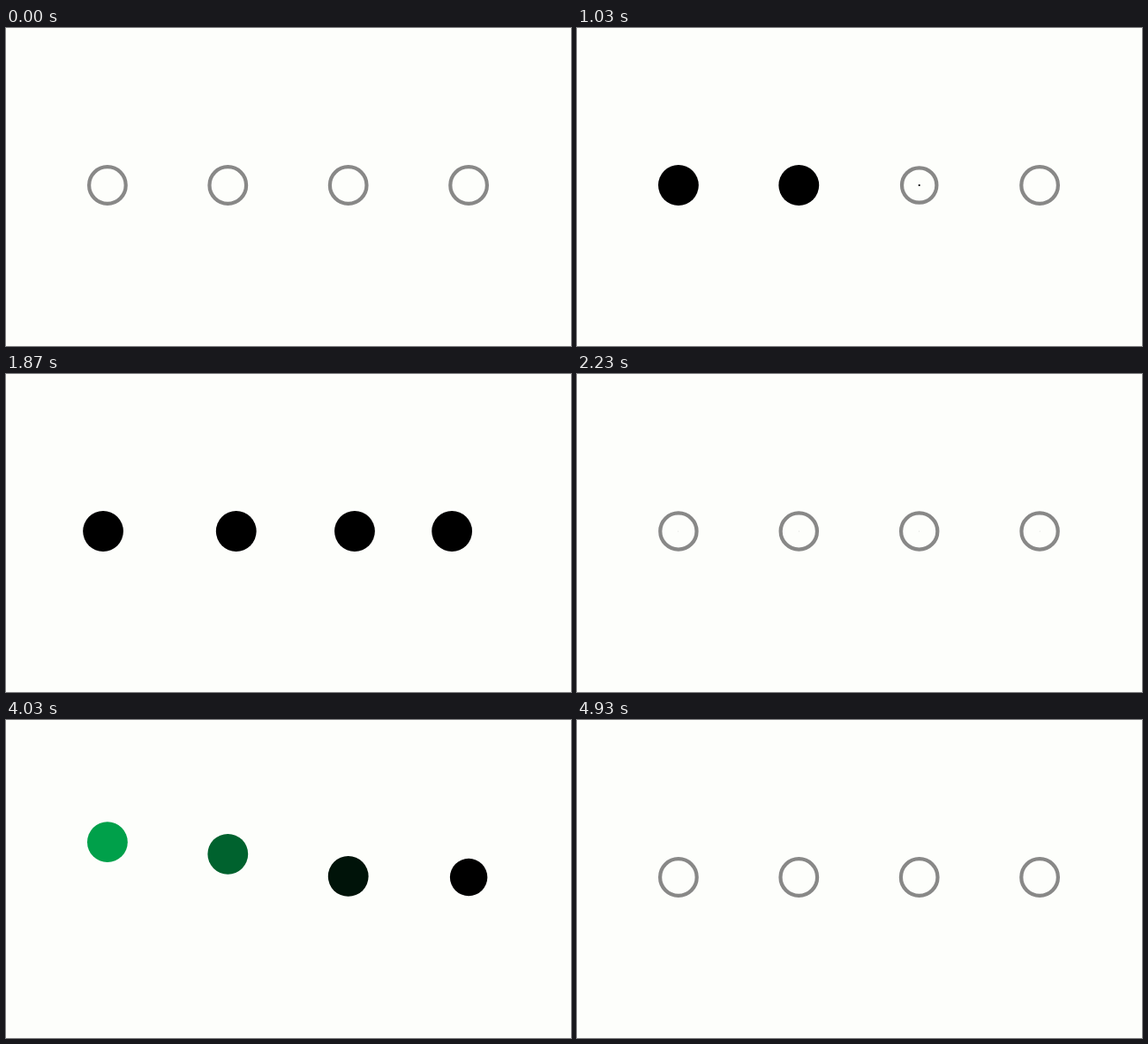
An HTML page with a canvas for the animation above (4.96 s loop, 640 by 360 pixels).

```html
<!DOCTYPE html>
<html lang="en">
<head>
<meta charset="utf-8">
<title>Passcode dots</title>
<style>
  html, body { margin: 0; width: 100%; height: 100%; overflow: hidden; background: #fdfefb; }
  canvas { display: block; }
</style>
</head>
<body>
<canvas id="stage" width="640" height="360"></canvas>
<script>
const ctx = document.getElementById('stage').getContext('2d');
const LOOP = 4960, RADIUS = 22.9, STROKE = 4.2, FILL_TIME = 230;
const RING = '#888887', GREEN = [0, 168, 78];

const easeInOut = power => u => u < .5
  ? Math.pow(2 * u, power) / 2
  : 1 - Math.pow(2 - 2 * u, power) / 2;
const quad = easeInOut(2), quart = easeInOut(4);

// Eased value at time t along [time, value] keys.
function track(t, keys, ease) {
  if (t <= keys[0][0]) return keys[0][1];
  for (let k = 1; k < keys.length; k++) {
    const [t0, v0] = keys[k - 1], [t1, v1] = keys[k];
    if (t < t1) return v0 + (v1 - v0) * ease((t - t0) / (t1 - t0));
  }
  return keys[keys.length - 1][1];
}

const ramp = (t, start, time = FILL_TIME) => track(t, [[start, 0], [start + time, 1]], quad);

const SHAKE = [[0, 0], [100, 20], [230, -23], [330, 12], [420, -6], [480, 0]];
const JUMP = [[0, 0], [180, -40], [510, 15.2], [700, 0]];

// Two entries: a rejected one, then an accepted one.
const WRONG = { keys: [500, 750, 995, 1235], clear: 2015 };
const RIGHT = { keys: [2975, 3281, 3510, 3845], clear: 4675 };
const SHAKE_AT = 1467, SHAKE_GAP = 50, JUMP_AT = 3878, JUMP_GAP = 55;

function circle(x, y, r) {
  ctx.beginPath();
  ctx.arc(x, y, r, 0, 2 * Math.PI);
}

function drawDot(i, t) {
  const entry = t < 2600 ? WRONG : RIGHT;
  const full = ramp(t, entry.keys[i]) - ramp(t, entry.clear);
  const jumpTime = t - JUMP_AT - i * JUMP_GAP;
  const x = 114.9 + 136.4 * i + track(t - SHAKE_AT - i * SHAKE_GAP, SHAKE, quad);
  const y = 178 + track(jumpTime, JUMP, quart);

  const ring = RADIUS * (1 - full) - STROKE / 2;
  if (ring > 0) {
    circle(x, y, ring);
    ctx.strokeStyle = RING;
    ctx.lineWidth = STROKE;
    ctx.stroke();
  }
  if (full > 0) {
    const tint = ramp(jumpTime, 0, 180);
    circle(x, y, RADIUS * full);
    ctx.fillStyle = `rgb(${GREEN.map(c => Math.round(c * tint))})`;
    ctx.fill();
  }
}

function draw(now) {
  const t = now % LOOP;
  ctx.fillStyle = '#fdfefb';
  ctx.fillRect(0, 0, 640, 360);
  for (let i = 0; i < 4; i++) drawDot(i, t);
  requestAnimationFrame(draw);
}
draw(0);
</script>
</body>
</html>
```
